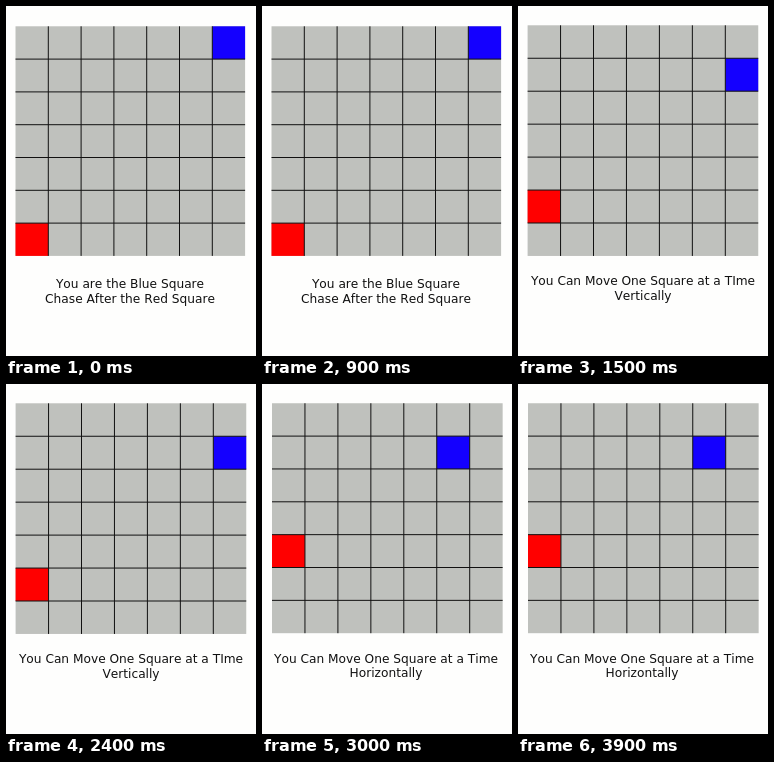
Animation of 250x350 px, one loop 4.5 s. Source, as an HTML page with a canvas:

```html
<!DOCTYPE html>
<html lang="en">
<head>
<meta charset="utf-8">
<title>Chase the red square</title>
<style>
  html, body { margin: 0; width: 100%; height: 100%; overflow: hidden; background: #fefefd; }
  canvas { display: block; }
</style>
</head>
<body>
<canvas id="stage" width="250" height="350"></canvas>
<script>
const ctx = document.getElementById("stage").getContext("2d");
const STEP = 1500;
const COUNT = 7;

// Board corner and cell size, [column, row] of each square, caption lines [text, centre, baseline].
const scenes = [
  {
    left: 9.5, top: 20.3, cellW: 32.8, cellH: 32.8,
    blue: [6, 0], red: [0, 6],
    text: [["You are the Blue Square", 124, 282], ["Chase After the Red Square", 124, 297]]
  },
  {
    left: 9.6, top: 19.3, cellW: 32.95, cellH: 32.95,
    blue: [6, 1], red: [0, 5],
    text: [["You Can Move One Square at a TIme", 125, 279], ["Vertically", 125, 294]]
  },
  {
    left: 10, top: 19.25, cellW: 32.95, cellH: 32.85,
    blue: [5, 1], red: [0, 4],
    text: [["You Can Move One Square at a Time", 124, 279], ["Horizontally", 124, 293]]
  }
];

function fillCell({ left, top, cellW, cellH }, [col, row], color) {
  ctx.fillStyle = color;
  ctx.fillRect(left + col * cellW, top + row * cellH, cellW, cellH);
}

function draw(scene) {
  const { left, top, cellW, cellH } = scene;
  const width = COUNT * cellW;
  const height = COUNT * cellH;
  ctx.fillStyle = "#fefefd";
  ctx.fillRect(0, 0, 250, 350);
  ctx.fillStyle = "#bfc1bd";
  ctx.fillRect(left, top, width, height);
  fillCell(scene, scene.blue, "#1400ff");
  fillCell(scene, scene.red, "#ff0000");

  ctx.fillStyle = "#111";
  for (let i = 1; i < COUNT; i++) {
    ctx.fillRect(left + i * cellW - 0.5, top, 1, height);
    ctx.fillRect(left, top + i * cellH - 0.5, width, 1);
  }

  ctx.font = '12.2px "DejaVu Sans", sans-serif';
  ctx.fontKerning = "none";
  ctx.textAlign = "center";
  for (const [line, x, y] of scene.text) ctx.fillText(line, x, y);
}

function tick() {
  draw(scenes[Math.floor(performance.now() / STEP) % scenes.length]);
  requestAnimationFrame(tick);
}
tick();
</script>
</body>
</html>
```
